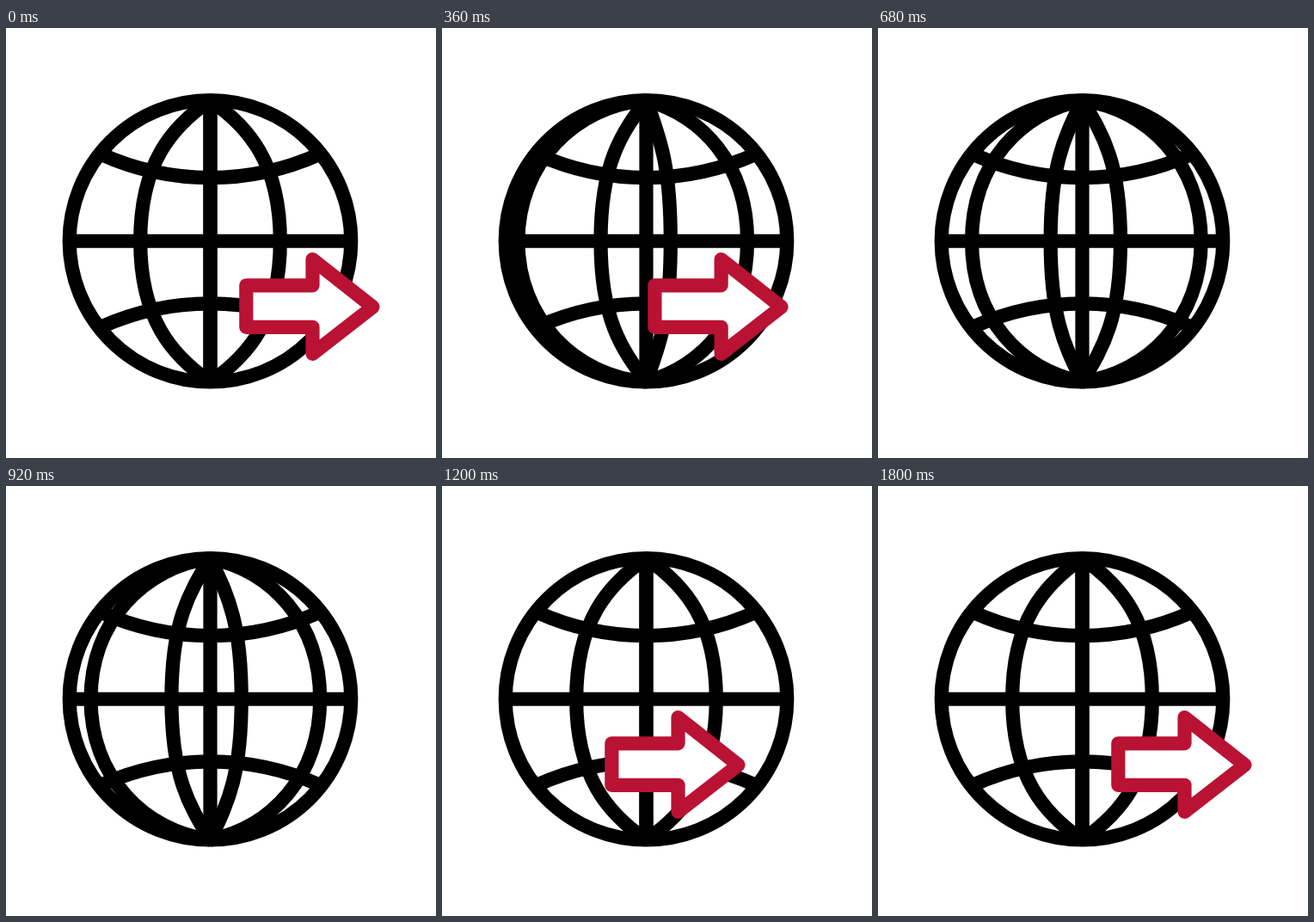
An HTML page with a canvas for the animation above (2000 ms loop, 500 px wide and 500 px high).

```html
<!DOCTYPE html>
<html lang="en">
<head>
<meta charset="utf-8">
<title>Globe with arrow</title>
<style>
  html, body { margin: 0; width: 100%; height: 100%; overflow: hidden; background: #fff; }
  canvas { display: block; width: 500px; height: 500px; }
</style>
</head>
<body>
<canvas id="stage" width="500" height="500"></canvas>
<script>
const ctx = document.getElementById('stage').getContext('2d');
const LOOP = 2000, STEP = 40;
const CX = 237.5, CY = 247.75, R = 163.75, LINE = 16.2;
const SPIN_END = 1068, SPIN_UNITS = 4;

const smooth = x => { x = Math.min(1, Math.max(0, x)); return x * x * (3 - 2 * x); };

function stroke(build) {
  ctx.beginPath();
  build();
  ctx.stroke();
}

// Pole-to-pole curve: pointed when narrow, close to an ellipse near the rim.
function meridian(x) {
  const k = 0.552, h = 0.71 + 0.29 * (Math.abs(x) / R) ** 1.5;
  ctx.moveTo(0, -R);
  ctx.bezierCurveTo(k * x, -h * R, x, -k * R, x, 0);
  ctx.bezierCurveTo(x, k * R, k * x, h * R, 0, R);
}

// Arc over a horizontal chord, bulging toward the equator.
function latitude(side) {
  const half = 127, sag = 27.3;
  const r = (half * half + sag * sag) / (2 * sag);
  const mid = -side * Math.PI / 2, spread = Math.asin(half / r);
  ctx.arc(0, side * (100.5 - sag + r) - 0.5, r, mid - spread, mid + spread);
}

// Even steps between the inner positions, wider ones toward the rim.
function meridianX(p) {
  const d = Math.abs(p);
  return Math.sign(p) * (81.3 * Math.min(d, 1) + 104 * Math.max(d - 1, 0));
}

function drawGlobe(t) {
  const turn = t < SPIN_END ? t / SPIN_END * SPIN_UNITS : 0;
  const phase = turn % 1;
  ctx.save();
  ctx.translate(CX, CY);
  ctx.strokeStyle = '#000';
  ctx.lineWidth = LINE;
  stroke(() => ctx.arc(0, 0, R, 0, Math.PI * 2));
  stroke(() => { ctx.moveTo(-R, 0); ctx.lineTo(R, 0); });
  stroke(() => { ctx.moveTo(0, -R); ctx.lineTo(0, R); });
  for (const side of [-1, 1]) stroke(() => latitude(side));
  for (let i = -2; i <= 1; i++) {
    const x = meridianX(i + phase);
    if (Math.abs(x) < R) stroke(() => meridian(x));
  }
  ctx.restore();
}

// Overshoot near rest, then a long sweep off the stage.
function sweep(w) {
  const peak = 37.5, turn = 380;
  return w < turn
    ? peak * smooth((w / turn) ** 2.8)
    : peak - 964 * smooth((w - turn) / 1000);
}

function arrowShift(t) {
  if (t < 800) return -sweep(t * 1.18);
  return t < 1800 ? sweep(1800 - t) : 0;
}

function drawArrow(t) {
  ctx.save();
  ctx.translate(arrowShift(t), 323.8);
  ctx.beginPath();
  ctx.moveTo(279.3, -24.5);
  ctx.lineTo(356.5, -24.5);
  ctx.lineTo(356.5, -54.7);
  ctx.lineTo(426.5, 0.5);
  ctx.lineTo(356.5, 55);
  ctx.lineTo(356.5, 24);
  ctx.lineTo(279.3, 24);
  ctx.closePath();
  ctx.fillStyle = '#fff';
  ctx.fill();
  ctx.strokeStyle = '#ba1233';
  ctx.lineWidth = LINE;
  ctx.lineJoin = 'round';
  ctx.stroke();
  ctx.restore();
}

const start = performance.now();

function frame() {
  const now = (performance.now() - start) % LOOP;
  const t = Math.floor(now / STEP) * STEP;
  ctx.fillStyle = '#fff';
  ctx.fillRect(0, 0, 500, 500);
  drawGlobe(t);
  drawArrow(t);
  requestAnimationFrame(frame);
}
frame();
</script>
</body>
</html>
```
